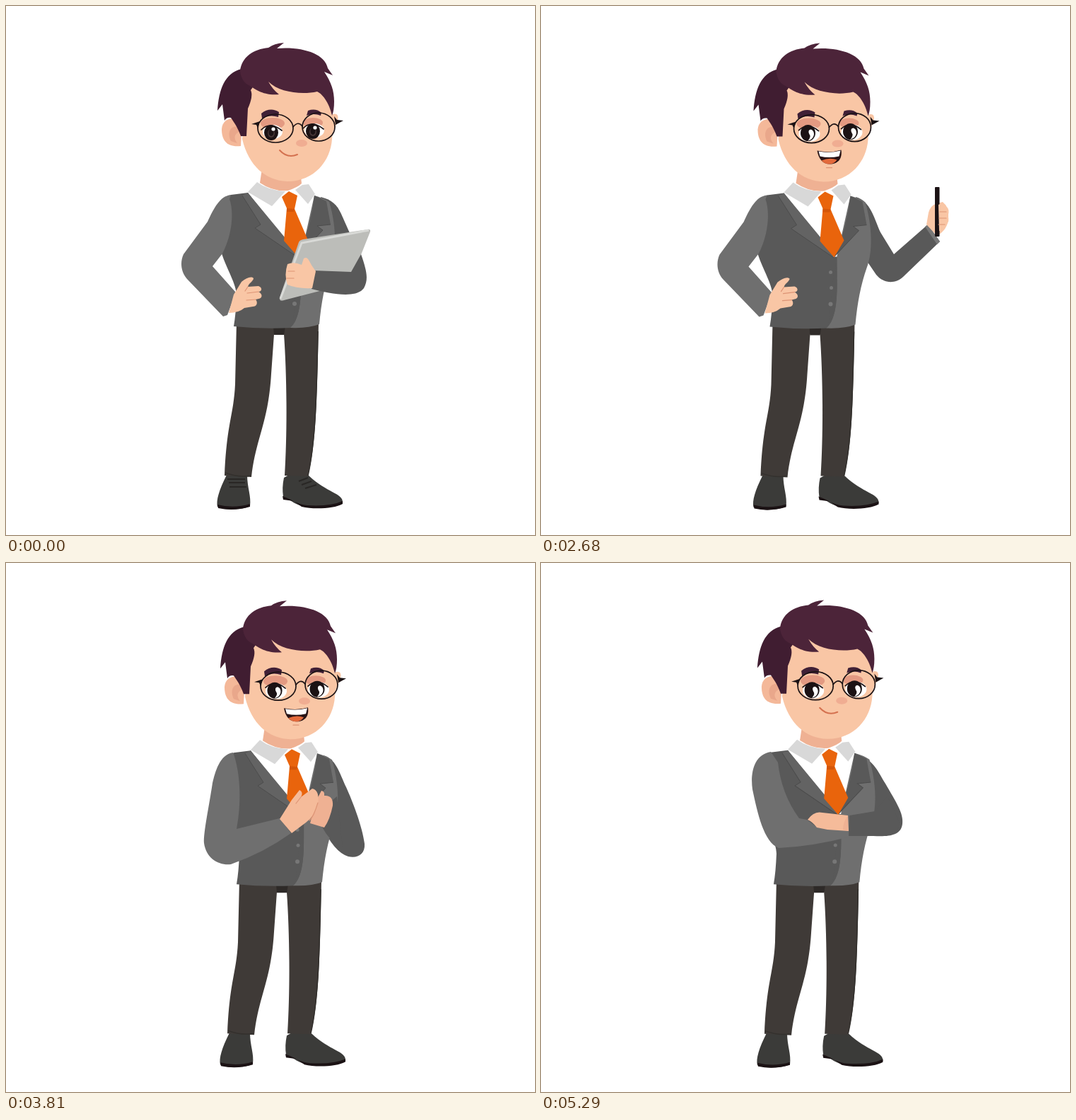
An HTML page for the animation above (6290 ms loop, 748 by 748 pixels).

```html
<!DOCTYPE html>
<html lang="en">
<head>
<meta charset="utf-8">
<title>Office worker poses</title>
<style>
html, body { margin: 0; width: 100%; height: 100%; overflow: hidden; background: #fff; }
svg { display: block; width: 100vw; height: 100vh; overflow: hidden; }
#strip { animation: poses 6290ms step-end infinite; }
@keyframes poses {
  0% { transform: translateX(0); }
  15.8983% { transform: translateX(-748px); }
  31.7965% { transform: translateX(-1496px); }
  49.7615% { transform: translateX(-2244px); }
  67.7266% { transform: translateX(-2992px); }
  84.1017% { transform: translateX(-3740px); }
}
.dark { fill: #595959; }
.mid { fill: #636363; }
.light { fill: #6f6f6f; }
.skin { fill: #f9c6a5; }
.warm { fill: #f5bb9a; }
.shade { fill: #efb193; }
.white { fill: #fff; }
.ink { fill: #1b1214; }
.hair { fill: #4c2439; }
.hairBack { fill: #401d31; }
.shoe { fill: #3b3b39; }
.line { fill: none; stroke: #1b1214; stroke-width: 1.7; stroke-linecap: round; }
.lid { stroke-width: 4.6; }
.crease { fill: none; stroke: #dd9475; stroke-width: 1.2; stroke-linecap: round; }
.finger { fill: none; stroke: #f9c6a5; stroke-width: 8; stroke-linecap: round; }
</style>
</head>
<body>
<svg viewBox="0 0 748 748">
<defs>
  <g id="legs">
    <path class="shoe" d="M312 663C301 685 297 699 299 708C311 714 336 712 345 707C347 693 341 681 341 663Z"/>
    <path class="ink" d="M299 705Q322 711 345 704V708Q322 715 300 710Z"/>
    <path class="shoe" d="M393 667Q390 681 392 694C404 699 409 706 424 708C443 711 466 709 476 702C477 689 453 688 428 664L400 663Z"/>
    <path class="ink" d="M391 693C405 698 412 705 426 706Q458 708 476 700V704C464 711 434 712 418 708L407 700L392 698Z"/>
    <path fill="#3f3a37" d="M326 447L324 535C322 578 312 590 309 664L347 666C353 611 371 590 375 520L379 464H393C397 520 398 600 394 664L427 665C438 620 440 560 442 447Z"/>
    <path fill="#2e2a28" d="M378 453H395L393 465H379Z"/>
    <path fill="none" stroke="#33302d" stroke-width="1.5" d="M441 460C439 560 437 620 427 664M310 660Q329 667 346 664"/>
  </g>

  <g id="torso">
    <path class="white" d="M343 262L356 249H428L437 266L425 345L412 356Z"/>
    <path class="dark" d="M342 264L318 267C301 276 296 325 305 350C312 372 326 393 326 410Q325 436 322 453Q362 457 403 455L419 440L418 354L412 354Z"/>
    <path class="light" d="M436 268Q448 271 457 277C467 310 468 348 459 370Q447 404 443 450Q428 456 402 455C417 441 418 412 417 353Z"/>
    <path class="dark" d="M402 455Q418 441 417 390L414 362L406 445Z"/>
    <path class="mid" d="M342 264L334 268L360 309L352 314L412 355L413 350Z"/>
    <path class="dark" d="M436 268L453 276L459 309L440 311L448 317L413 355Q431 313 436 268Z"/>
    <path fill="none" stroke="#4c4c4c" d="M334 268L360 309L352 314L412 355L448 317L440 311L459 309"/>
    <g fill="#777"><circle cx="408" cy="376" r="2.5"/><circle cx="409" cy="398" r="2.5"/><circle cx="408" cy="421" r="3"/></g>
    <path class="shade" d="M362 230L359 250Q378 263 399 261Q413 256 418 251L416 232Z"/>
    <path fill="#d8d8d8" d="M355 249L342 263L376 283L395 262Q371 261 355 249Z"/>
    <path fill="#d8d8d8" d="M409 260L419 253L428 252L437 266L427 280Z"/>
    <path fill="#e9640c" d="M400 262L390 270L397 286L393 332L413 355L427 331L408 287L412 268Z"/>
    <path fill="#d45508" d="M397 286L408 287L407 291H397Z"/>
  </g>

  <g id="head">
    <path fill="#f4b899" d="M334 161C317 156 306 161 305 174C305 190 312 200 332 198Z"/>
    <path fill="#e9a78b" d="M329 171C318 168 312 178 318 191L327 194Q319 184 329 178Z"/>
    <path class="skin" d="M461 153Q473 150 468 165L461 181Z"/>
    <path class="skin" d="M340 113L334 188C343 226 367 247 398 248C436 248 459 219 461 188Q466 149 448 117L380 102Z"/>
    <path class="hairBack" d="M299 148C301 118 309 95 333 89L360 99L346 119Q350 127 342 145L340 184H332C327 170 322 164 318 158Q312 157 309 162L306 139Z"/>
    <path class="hair" d="M331 92C333 72 350 61 371 59Q379 53 393 52L383 60C418 57 451 67 455 88L462 98L450 93C460 108 464 120 464 135Q464 148 461 155C458 140 449 125 440 121C418 126 386 122 371 107Q377 118 386 125C363 127 352 117 345 113Q333 108 331 92Z"/>
    <path fill="#402036" d="M361 152C369 145 379 145 386 150L385 157Q373 153 362 159ZM425 155L427 148Q438 144 446 151L445 155Q435 151 425 155Z"/>
    <g fill="#e39a82"><ellipse cx="377" cy="166" rx="17" ry="8"/><ellipse cx="434" cy="165" rx="14" ry="7"/></g>
    <ellipse cx="418" cy="194" rx="8" ry="5" fill="#f0ad92"/>
  </g>

  <g id="glasses">
    <g class="line"><ellipse cx="381" cy="173" rx="25" ry="20"/><ellipse cx="442" cy="171" rx="23" ry="20"/><path d="M406 171Q413 162 419 170"/></g>
    <path class="ink" d="M347 167L359 163L356 173L354 168ZM464 156L468 161L477 162L466 168Z"/>
  </g>

  <g id="calmEye">
    <ellipse class="white" cx="2" rx="14" ry="10"/>
    <path class="line" d="M-14 -3Q-2 -15 15 -2"/>
    <ellipse class="ink" cy="1" rx="10" ry="11"/>
    <ellipse cy="2" rx="5" ry="6" fill="#463535"/>
    <ellipse class="ink" cy="1" rx="3.5" ry="5"/>
    <circle class="white" cx="3" cy="-4" r="2.6"/>
  </g>
  <g id="brightEye">
    <ellipse class="white" cx="2" cy="1" rx="15" ry="11"/>
    <path class="line" d="M-13 -4Q0 -16 15 -3"/>
    <ellipse class="ink" rx="10.5" ry="11.5"/>
    <path class="white" d="M4 -5C11 -3 10 9 0 11Q5 5 2 2Q-1 -4 4 -5Z"/>
  </g>
  <path id="shutEye" class="line lid" d="M-11 5C-9 -10 9 -10 11 4"/>
  <g id="calmEyes"><use href="#calmEye" x="375" y="178"/><use href="#calmEye" x="434" y="176"/></g>
  <g id="brightEyes"><use href="#brightEye" x="376" y="179"/><use href="#brightEye" x="436" y="177"/></g>

  <path id="smile" fill="none" stroke="#d4714f" stroke-width="2" stroke-linecap="round" d="M387 204Q398 216 412 210"/>
  <g id="grin">
    <path class="white" stroke="#efa98f" d="M387 204Q405 207 423 204C423 217 414 224 405 224C395 224 388 216 387 204Z"/>
    <path class="crease" d="M400 228Q406 231 411 227"/>
  </g>
  <g id="talk">
    <path fill="#281315" d="M389 204Q407 208 423 203C425 216 418 223 407 223C397 223 391 216 389 204Z"/>
    <path class="white" d="M391 205Q407 208 422 204L420 212Q406 215 393 212Z"/>
    <path fill="#e36a3c" d="M395 218Q407 213 417 217Q413 223 406 223Q400 223 395 218Z"/>
    <path class="crease" d="M402 228H410"/>
  </g>

  <g id="body"><use href="#legs"/><use href="#torso"/><use href="#head"/></g>

  <g id="hipArm">
    <path class="light" d="M318 267C302 269 294 286 285 305L251 351C246 362 247 376 256 386L307 439L313 437L325 405L292 368L306 350C321 321 322 289 316 273Z"/>
    <path class="skin" d="M315 434L322 408L333 390C340 384 347 382 350 385C350 389 343 392 342 397L357 396C363 398 362 404 357 404C363 407 363 413 357 414L353 415C357 420 354 425 349 425L337 427Q329 434 315 434Z"/>
    <path class="crease" d="M342 397L338 403M357 404L341 406M353 415L340 416"/>
  </g>
</defs>

<g id="strip">
  <g>
    <path class="dark" d="M445 270C461 274 468 281 474 294L490 330L460 365Z"/>
    <use href="#body"/><use href="#calmEyes"/><use href="#smile"/><use href="#glasses"/>
    <path fill="none" stroke="#292725" stroke-width="2" d="M313 669H338M315 674H338M316 680H340M414 672L427 667M418 677L432 672M423 682L439 677"/>
    <use href="#hipArm"/>
    <path fill="#bcbdb9" d="M414 334Q415 331 420 330L511 316Q516 315 515 319L486 392L393 416Q386 418 387 412Z"/>
    <path fill="none" stroke="#d9dad7" stroke-width="3" d="M513 317L418 335L388 414"/>
    <path class="dark" d="M434 374L488 376L502 351C510 374 513 386 506 399C495 414 459 407 432 400Z"/>
    <path class="skin" d="M398 365Q407 361 418 366L421 357C427 353 429 362 433 368L438 375L433 399Q411 400 398 394Q393 380 398 365Z"/>
    <path class="crease" d="M399 375H408M397 385H407"/>
  </g>

  <g transform="translate(748)">
    <path class="dark" d="M455 275C465 281 468 292 474 305L492 350C498 368 497 386 489 402L456 441L442 451L445 395Z"/>
    <use href="#body"/><use href="#shutEye" x="376" y="177"/><use href="#shutEye" x="437" y="175"/><use href="#grin"/><use href="#glasses"/>
    <circle class="white" cx="456" cy="380" r="1.8"/>
    <path class="skin" d="M245 258L241 212Q256 202 273 212L272 238L266 260Z"/>
    <path class="finger" d="M246 217L236 197M252 213L247 181M260 213L262 180M267 216L275 187"/>
    <path class="skin" d="M269 226L284 219Q290 221 285 225L270 240Z"/>
    <path fill="#e29c7e" d="M244 250Q254 255 267 250L266 259H245Z"/>
    <path class="light" d="M318 267C300 270 289 292 273 304L271 299L272 259L239 256C232 291 222 342 220 367C218 387 225 395 240 394C266 388 284 368 306 352C321 323 322 289 316 273Z"/>
  </g>

  <g transform="translate(1496)">
    <path class="dark" d="M445 270C466 275 472 303 480 320L499 351L547 309L564 333L512 383C500 394 484 392 474 380L457 355Z"/>
    <path fill="#777" d="M543 312L547 309L564 333L560 337Z"/>
    <g transform="translate(1.5 .6)">
      <use href="#body"/><use href="#brightEyes"/><use href="#talk"/><use href="#glasses"/><use href="#hipArm"/>
    </g>
    <path class="skin" d="M545 309L548 292Q551 282 558 280L568 277Q577 285 576 301Q575 316 560 325Z"/>
    <rect class="ink" x="557" y="256" width="6.5" height="70" rx="1"/>
    <path class="skin" d="M562 281Q570 276 573 283Q579 289 575 296Q579 305 572 310Q570 319 563 318Z"/>
    <path class="crease" d="M564 291H573M563 300H573M562 309H571"/>
  </g>

  <g transform="translate(2244)">
    <path class="dark" d="M448 272C466 275 472 298 481 317C497 353 505 381 507 397C508 412 497 418 484 415Q464 409 447 372Z"/>
    <g transform="translate(4 1.2)"><use href="#body"/><use href="#brightEyes"/><use href="#talk"/><use href="#glasses"/></g>
    <path class="dark" d="M450 345L468 330L476 402Q457 394 446 371Z"/>
    <path class="light" d="M321 268C302 271 296 295 292 311C287 345 279 381 280 396C283 418 301 428 318 426Q364 410 403 382L387 361L326 376C333 341 332 297 321 268Z"/>
    <path class="shade" d="M438 337L446 322Q451 323 450 329Q463 328 462 343Q458 363 450 374L430 368Z"/>
    <path class="warm" d="M387 362L404 335L415 321Q421 324 417 331L433 319Q444 321 441 342Q437 357 424 367L404 382Z"/>
    <path class="crease" d="M417 331L410 340M441 339Q435 359 429 364"/>
  </g>

  <g transform="translate(2992)">
    <path class="dark" d="M450 273C470 277 475 300 482 316L506 352L552 312L574 340L524 386C510 398 491 395 480 382L462 357Z"/>
    <g transform="matrix(1.003 0 0 1.006 5.3 .7)">
      <use href="#body"/><use href="#shutEye" x="376" y="177"/><use href="#brightEye" x="437" y="176"/><use href="#grin"/><use href="#glasses"/>
    </g>
    <path class="light" d="M323 268C306 270 297 298 290 315L266 377C261 399 273 423 291 424L389 400L386 363L313 377L322 353C335 322 333 291 323 268Z"/>
    <path class="warm" d="M386 363L405 348Q416 341 425 341Q430 343 420 351L432 350Q437 354 431 358L434 361Q437 366 430 368L433 372Q434 377 426 377L411 378Q402 385 388 385Z"/>
    <path class="crease" d="M420 351L412 357M431 358L414 363M430 368L414 370"/>
    <path class="warm" d="M556 315Q566 308 571 296L580 286Q585 287 582 294L582 303L611 300Q628 298 632 303Q631 311 614 320Q595 332 573 331Z"/>
    <path class="crease" d="M582 303L577 308M609 309L629 304"/>
  </g>

  <g transform="translate(3740)">
    <path class="dark" d="M450 273C470 277 478 298 487 312C502 338 513 354 511 369C509 386 491 387 470 386L457 360Z"/>
    <g transform="matrix(1.003 0 0 1.002 6 .3)"><use href="#body"/><use href="#brightEyes"/><use href="#smile"/><use href="#glasses"/></g>
    <path class="light" d="M325 267C300 271 296 299 299 320C306 353 315 395 336 403Q383 401 437 387L434 377L391 374L376 363L365 361Q340 327 335 282Z"/>
    <path class="dark" d="M436 357L472 351L490 330L508 370Q502 386 470 386H435Z"/>
    <path class="warm" d="M377 363Q386 350 398 353L434 357L435 379L405 377L390 374Q384 366 377 363Z"/>
    <path class="shade" d="M434 357V379L427 377Q427 366 434 357Z"/>
  </g>
</g>
</svg>
</body>
</html>
```
